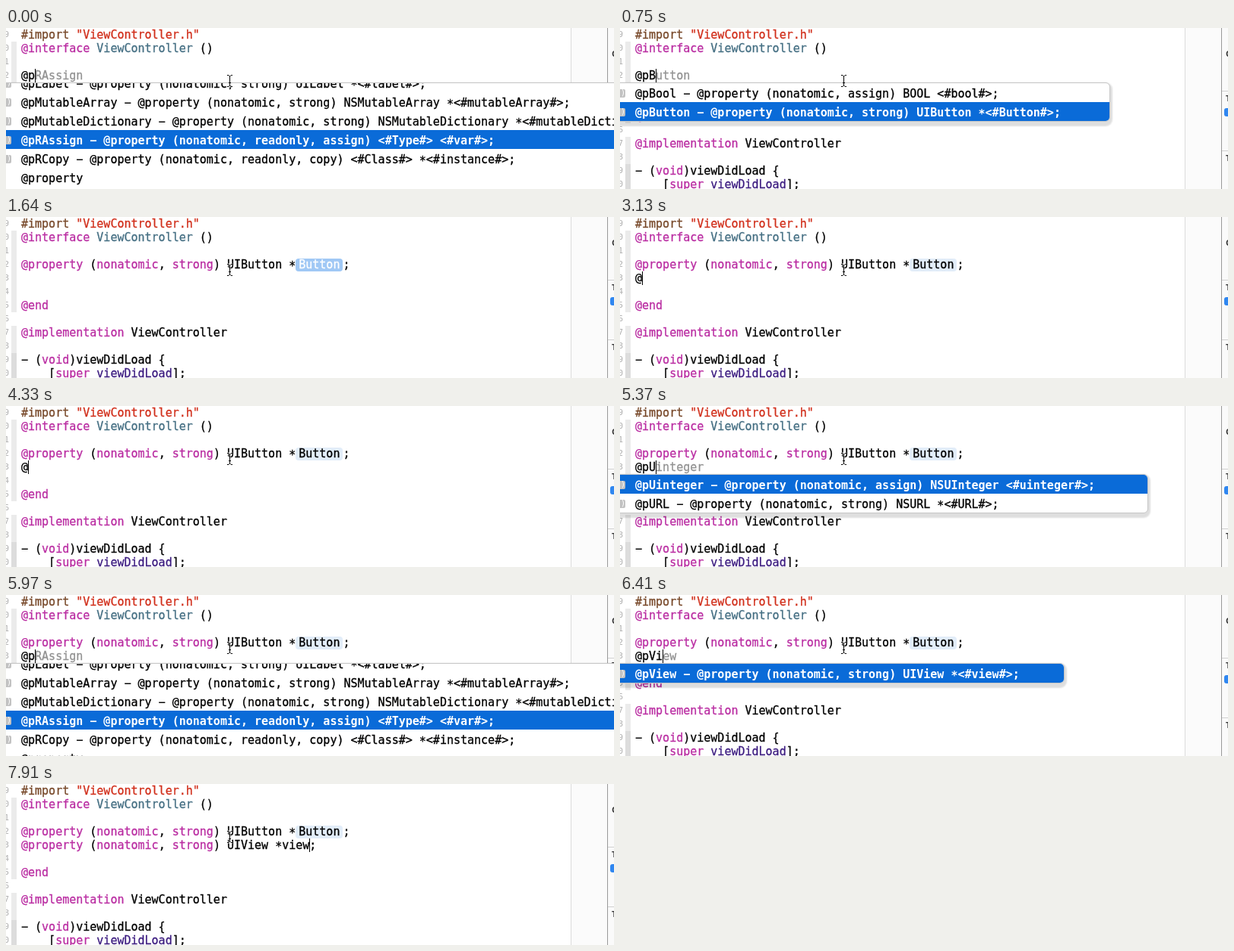
Write an HTML page that moves like this. It is 800 by 213 pixels and loops after 8000 ms.

```html
<!DOCTYPE html>
<html lang="en">
<head>
<meta charset="utf-8">
<title>Code completion</title>
<style>
  html, body { margin: 0; width: 100%; height: 100%; overflow: hidden; background: #fff; }
  #stage { position: relative; width: 800px; height: 213px; overflow: hidden; background: #fff;
    font: 15px/18px "DejaVu Sans Mono", "Liberation Mono", monospace; color: #000; }
  #stage div, #stage svg { position: absolute; }
  #code { left: 0; top: 0; width: 800px; height: 213px; }
  .line { left: 20px; height: 18px; white-space: pre; -webkit-text-stroke: .3px; }
  .num { right: 796px; font-size: 11px; color: #b0b0b0; }
  .fold { left: 7px; width: 7px; background: #ebebeb; }
  .k { color: #ba2da2; }
  .p { color: #78492a; }
  .s { color: #d12f1b; }
  .c { color: #456f83; }
  .m { color: #3d1d81; }
  .ghost { color: #929292; }
  .star { position: relative; top: 2px; }
  .slot { display: inline-block; height: 17px; margin-top: 1px; line-height: 16px; padding: 0 4px;
    border-radius: 4px; background: #e2edf9; vertical-align: top; }
  .slot.on { background: #a0c8f5; color: #fff; }
  .marked { background: #b3d7ff; }
  #caret { width: 1px; height: 18px; background: #000; }
  #margin { left: 743px; top: 0; width: 47px; height: 213px; background: #fbfbfb; border-left: 1px solid #dcdcdc; }
  #panel { left: 791px; top: 0; width: 8px; height: 213px; background: #fafafa; border-left: 1px solid #999; }
  #panel div { left: 5px; font: bold 11px/14px "Open Sans", sans-serif; color: #333; }
  #panel .rule { left: 0; width: 9px; height: 1px; background: #d0d0d0; }
  #panel .box { top: 106px; left: 3px; width: 12px; height: 11px; border-radius: 3px; background: #2f86f0; }
  #popup { left: -20px; overflow: hidden; background: #fff; border: 1px solid #c6c6c6; box-sizing: border-box;
    border-radius: 0 6px 6px 0; box-shadow: 0 3px 2px 3px rgba(0,0,0,.13); }
  #popup.bare { box-shadow: none; }
  .row { left: 0; width: 100%; height: 25px; line-height: 25px; white-space: pre; }
  .row .text { position: absolute; left: 39px; top: 2px; -webkit-text-stroke: .3px; }
  .row.on { background: #0a6bd8; color: #fff; }
  .row.on .text { font-weight: bold; -webkit-text-stroke: 0; }
  .row i { position: absolute; left: 13px; top: 8px; width: 13px; height: 11px; border-radius: 2px;
    background: #c2c2c2; color: #fff; font: 10px/10px "DejaVu Sans Mono", monospace; text-align: right; }
</style>
</head>
<body>
<div id="stage">
  <div class="fold" style="top:18px;height:108px"></div>
  <div class="fold" style="top:144px;height:69px"></div>
  <div class="fold" style="top:180px;height:33px;background:#dcdcdc"></div>
  <div id="margin"></div>
  <div id="panel">
    <div style="top:27px">C</div>
    <div class="rule" style="top:83px"></div>
    <div style="top:86px">T</div>
    <div class="box"></div>
    <div class="rule" style="top:162px"></div>
    <div style="top:165px">T</div>
  </div>
  <div id="code"></div>
  <div id="caret"></div>
  <div id="popup"></div>
  <svg style="left:288px;top:61px" width="13" height="18" fill="none">
    <path d="M3 1.5h2l1.5 1.5 1.5-1.5h2M6.5 3v12M5 11.5h3M3 16.5h2l1.5-1.5 1.5 1.5h2" stroke="#fff" stroke-width="2.4" stroke-opacity=".7"/>
    <path d="M3 1.5h2l1.5 1.5 1.5-1.5h2M6.5 3v12M5 11.5h3M3 16.5h2l1.5-1.5 1.5 1.5h2" stroke="#000"/>
  </svg>
</div>
<script>
const LOOP = 8000, LEFT = 20, CHAR = 9.03, LINE = 18, ROW = 25;
const $ = id => document.getElementById(id);
const esc = s => s.replace(/&/g, '&amp;').replace(/</g, '&lt;');
const tag = (cls, s) => `<span class="${cls}">${s}</span>`;
const key = s => tag('k', s);
// Asterisks sit on the middle of the line
const stars = html => html.replace(/\*/g, tag('star', '*'));

const property = rest => `${key('@property')} (${key('nonatomic')}, ${key('strong')}) ${rest}`;
const button = cls => property(`UIButton *${tag(cls, 'Button')};`);
const view = cls => property(`UIView *${tag(cls, 'view')};`);
const typed = (s, ghost) => s + tag('ghost', ghost);

const code = [
  tag('p', '#import ') + tag('s', '"ViewController.h"'),
  `${key('@interface')} ${tag('c', 'ViewController')} ()`,
  '', '', '', '',
  key('@end'),
  '',
  `${key('@implementation')} ViewController`,
  '',
  `\u2212 (${key('void')})viewDidLoad {`,
  `    [${key('super')} ${tag('m', 'viewDidLoad')}];`
];

const item = (name, attrs, rest) => `@p${name} \u2212 @property (nonatomic, ${attrs}) ${rest};`;
const pButton = item('Button', 'strong', 'UIButton *<#Button#>');
const lists = {
  all: { width: 860, height: 220, shift: -13, on: 3, rows: [
    item('Label', 'strong', 'UILabel *<#label#>'),
    item('MutableArray', 'strong', 'NSMutableArray *<#mutableArray#>'),
    item('MutableDictionary', 'strong', 'NSMutableDictionary *<#mutableDictionary#>'),
    item('RAssign', 'readonly, assign', '<#Type#> <#var#>'),
    item('RCopy', 'readonly, copy', '<#Class#> *<#instance#>'),
    '@property'] },
  b: { width: 665, on: 1, rows: [item('Bool', 'assign', 'BOOL <#bool#>'), pButton] },
  bu: { width: 665, on: 0, rows: [pButton] },
  u: { width: 715, on: 0, rows: [
    item('Uinteger', 'assign', 'NSUInteger <#uinteger#>'),
    item('URL', 'strong', 'NSURL *<#URL#>')] },
  vi: { width: 605, on: 0, rows: [item('View', 'strong', 'UIView *<#view#>')] }
};

// Each step: start time, row being edited, its text, caret column (-1 hides it), list
const steps = [
  [0, 3, typed('@p', 'RAssign'), 2, 'all'],
  [150, 3, typed('@p', 'RAssign'), -1, 'all'],
  [600, 3, typed('@p', 'RAssign'), 2, 'all'],
  [750, 3, typed('@pB', 'utton'), 3, 'b'],
  [900, 3, typed('@pBu', 'tton'), 4, 'bu'],
  [1350, 3, typed('@pBu', 'tton'), -1, 'bu'],
  [1640, 3, button('slot on'), -1],
  [2090, 4, '', 0],
  [2690, 4, '', -1],
  [3130, 4, '@', 1],
  [3730, 4, '@', -1],
  [4330, 4, '@', 1],
  [4770, 4, typed('@p', 'RAssign'), 2, 'all', 'bare'],
  [4920, 4, typed('@p', 'RAssign'), 2, 'all'],
  [5370, 4, typed('@pU', 'integer'), 3, 'u'],
  [5970, 4, typed('@p', 'RAssign'), 2, 'all'],
  [6410, 4, typed('@pVi', 'ew'), 4, 'vi'],
  [7010, 4, typed('@pVi', 'ew'), -1, 'vi'],
  [7160, 4, view('slot on'), -1],
  [7610, 4, view('marked'), -1],
  [7910, 4, view(''), 42]
];

function drawPopup(name, row, cls = '') {
  const popup = $('popup'), list = lists[name];
  popup.style.display = list ? '' : 'none';
  if (!list) return;
  const { rows, on, width, shift = 0, height = rows.length * ROW + 2 } = list;
  popup.className = cls;
  popup.style.top = (row + 1) * LINE + 'px';
  popup.style.width = width + 'px';
  popup.style.height = height + 'px';
  popup.innerHTML = rows.map((text, i) => {
    const icon = text === '@property' ? '' : '<i>)</i>';
    return `<div class="row ${i === on ? 'on' : ''}" style="top:${shift + i * ROW}px">` +
      icon + tag('text', stars(esc(text))) + '</div>';
  }).join('');
}

function draw([, row, text, col, list, cls]) {
  const lines = code.slice();
  if (row === 4) lines[3] = button('slot');
  lines[row] = text;
  $('code').innerHTML = lines.map((s, i) =>
    `<div class="num" style="top:${i * LINE}px">${(i + 9) % 10}</div>` +
    `<div class="line" style="top:${i * LINE}px">${stars(s)}</div>`).join('');
  const caret = $('caret').style;
  caret.display = col < 0 ? 'none' : '';
  caret.left = Math.floor(LEFT + col * CHAR) + 'px';
  caret.top = row * LINE + 'px';
  drawPopup(list, row, cls);
}

let shown = null;
const start = performance.now();
function tick() {
  const t = (performance.now() - start) % LOOP;
  const step = steps.filter(s => s[0] <= t).pop() || steps[0];
  if (step !== shown) draw(shown = step);
  requestAnimationFrame(tick);
}
tick();
</script>
</body>
</html>
```
